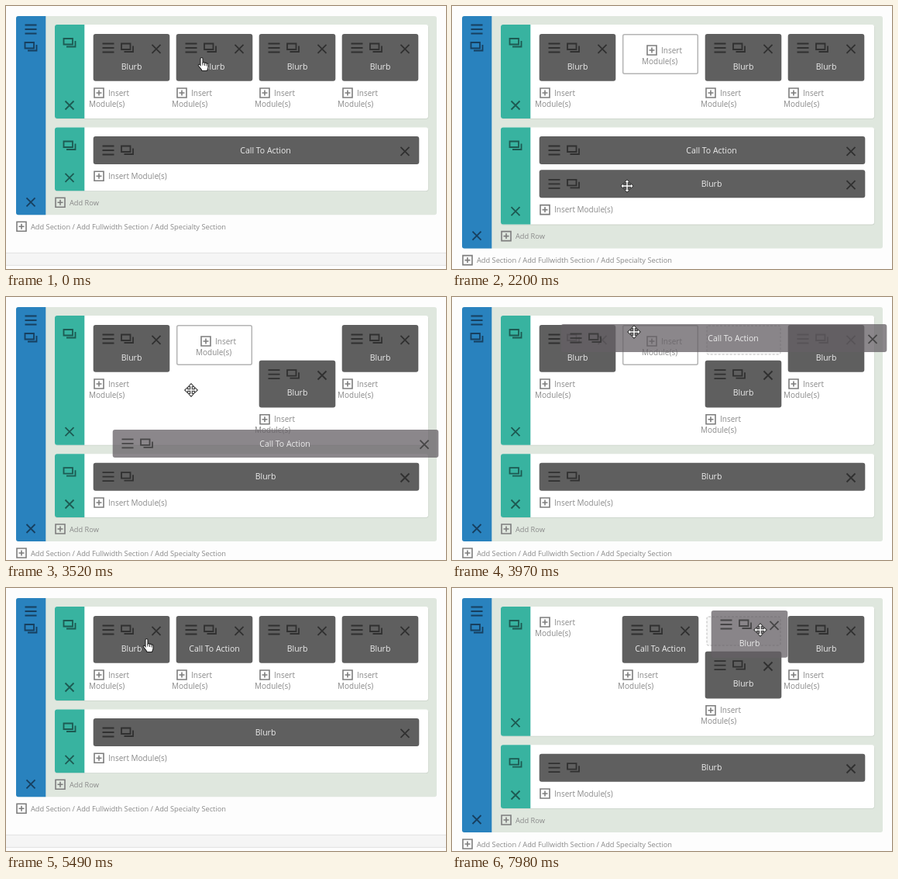
These frames come from a looping animation (568 by 339 pixels, 8 s). An HTML page:

```html
<!DOCTYPE html>
<html lang="en">
<head>
<meta charset="utf-8">
<title>Page builder drag and drop</title>
<style>
html, body { margin: 0; width: 100%; height: 100%; overflow: hidden; background: #fdfdfd; }
svg { display: block; width: 568px; height: 339px; font-family: "Open Sans", "Noto Sans", sans-serif; }
.module { fill: #5f5f5f; }
.icon { fill: none; stroke-width: 1.8; }
.plus { fill: none; stroke: #7d7d7d; stroke-width: 1.6; }
.label { font-size: 10.5px; fill: #ececec; text-anchor: middle; }
.insert { font-size: 10px; fill: #8a8a8a; }
.add { font-size: 9.25px; fill: #8a8a8a; }
.slot { fill: #f7f7f7; stroke: #bcbcbc; stroke-dasharray: 3 2; }
#item .module { fill: #645f64; fill-opacity: .75; }
#item .icon { opacity: .75; }
</style>
</head>
<body>
<svg viewBox="0 0 568 339">
  <g id="page"></g>
  <g id="item"></g>
  <g id="hand">
    <path d="M-3-7c0-2 3-2 3 0v5c1-1 2.500-.5 2.500.5c1-.8 2.500-.3 2.500.8c1-.5 2 0 2 1.200v3c0 2-1 3-1.500 5h-6.500c-.5-2-3-4-4.500-6.500c-.8-1.800 1-2.500 2.500-.5z"
      fill="#fff" stroke="#222" stroke-width="1.100"/>
    <path d="M0-2v3.500M2.500-1v3M5 0v2.500" stroke="#222" stroke-width=".9"/>
  </g>
  <g id="move">
    <path d="M0-8.300l3.600 3.900h-2.300v3.100h3.100v-2.300l3.900 3.600l-3.900 3.600v-2.300h-3.100v3.100h2.300l-3.600 3.900l-3.600-3.900h2.300v-3.100h-3.100v2.300l-3.900-3.600l3.900-3.600v2.300h3.100v-3.100h-2.300z"
      fill="#fff" stroke="#484848" stroke-width="1.200"/>
  </g>
</svg>
<script>
const LOOP = 8000, LAG = 40, SLOT_DELAY = 60, WIDE = 420, COL = 98, ROW = 4;
const $ = id => document.getElementById(id);

// Four columns, then the full-width row: B blurb, C call to action, P drop slot
const initial = ['B', 'B', 'B', 'B', 'C'];

// Each hop opens the drop slot: time, place, index within that place
const drags = [
  { code: 'B', from: 1, lift: 520, drop: 1750, hops: [[520, 1, 0], [900, ROW, 0], [1400, ROW, 1]] },
  { code: 'C', from: ROW, lift: 2760, drop: 5150, hops: [[2760, ROW, 0], [3490, 2, 0], [4990, 1, 0]] },
  { code: 'B', from: 0, lift: 7000, drop: LOOP, hops: [[7000, 0, 0], [7250, 1, 0], [7560, 2, 0]] }
];

// Pointer stops: departure, arrival, x, y
const stops = [
  [-1, 0, 254, 75], [100, 420, 242, 84], [600, 1080, 265, 215],
  [1180, 1680, 226, 232], [2420, 2700, 207, 178], [2900, 3440, 232, 181],
  [3480, 3520, 239, 120], [3560, 3900, 235, 45], [4000, 4600, 213, 46],
  [5150, 5450, 183, 74], [5830, 6200, 240, 82], [6200, 6700, 176, 61],
  [7030, 7930, 398, 54]
];

const rect = (x, y, w, h, attrs) =>
  `<rect x="${x}" y="${y}" width="${w}" height="${h}" ${attrs}/>`;
const text = (x, y, cls, s) => `<text x="${x}" y="${y}" class="${cls}">${s}</text>`;
const shape = (d, x, y, color) =>
  `<path class="icon" d="${d}" transform="translate(${x} ${y})" stroke="${color}"/>`;
const bars = (x, y, c) => shape('M-7.500-5.500h15M-7.500 0h15M-7.500 5.500h15', x, y, c);
const copy = (x, y, c) => shape('M-8-5.500h11.500v7.500h-11.500zM7-2.500v7.500h-11.500', x, y, c);
const cross = (x, y, c) => shape('M-5.500-5.500l11 11M5.500-5.500l-11 11', x, y, c);
const plus = (x, y) =>
  `<path class="plus" d="M${x - 6} ${y - 6}h12v12h-12zM${x - 3.5} ${y}h7M${x} ${y - 3.5}v7"/>`;
const sidebar = (x, y, w, h, color) =>
  `<path d="M${x + w} ${y}v${h}h${3 - w}q-3 0-3-3v${6 - h}q0-3 3-3z" fill="${color}"/>`;

const isWide = place => place === ROW;
const home = place => isWide(place) ? [113, 168] : [113 + 107 * place, 36];

function moduleBox(x, y, wide, code) {
  const dark = '#303030';
  return rect(x - .3, y, (wide ? WIDE : COL) + .6, wide ? 36 : 60.7, 'rx="3" class="module"') +
    bars(x + 19, y + 18, dark) + copy(x + 44, y + 18, dark) +
    cross(x + (wide ? 402 : 81), y + 19.300, dark) +
    text(x + (wide ? 222 : 49), y + (wide ? 21.7 : 45.7), 'label',
      code === 'C' ? 'Call To Action' : 'Blurb');
}

function insertLink(x, y, wide) {
  return plus(x + 7, y) + (wide
    ? text(x + 19, y + 3.6, 'insert', 'Insert Module(s)')
    : text(x + 19, y + 3.6, 'insert', 'Insert') + text(x - 6, y + 17.6, 'insert', 'Module(s)'));
}

// Stacks modules downwards and returns the markup with the next free y
function stack(x, y, wide, codes) {
  if (codes === 'E') {
    const frame = rect(x + .7, y + .7, COL - 1.4, 50.5, 'rx="2" fill="#fff" stroke="#b4b4b4" stroke-width="1.5"');
    return { svg: frame + insertLink(x + 31, y + 21), y };
  }
  let svg = '';
  for (const code of codes) {
    if (code === 'P') svg += rect(x + 2, y + 1, (wide ? WIDE : COL) - 3, 37, 'class="slot" rx="2"');
    else if (code !== ' ') svg += moduleBox(x, y, wide, code);
    y += 'P '.includes(code) ? 45.7 : wide ? 43.3 : 68;
  }
  return { svg: svg + insertLink(x, y + 8, wide), y };
}

function rowBox(top, bottom, content) {
  const h = bottom - top, dark = '#1d5a52';
  return rect(63, top + .8, 482.5, h, 'rx="3" fill="#cbd3ca"') +
    rect(63, top, 482, h, 'rx="3" fill="#fff"') +
    sidebar(63, top, 38.3, h, '#38b3a0') +
    copy(82.5, top + 23.5, dark) + cross(82, bottom - 17, dark) + content;
}

function drawPage(places) {
  const columns = places.slice(0, ROW).map((codes, i) => stack(...home(i), false, codes));
  const end1 = Math.max(...columns.map(c => c.y)) + 41;
  const top2 = end1 + 11.5;
  const wideRow = stack(113, top2 + 11.5, true, places[ROW]);
  const end2 = wideRow.y + 27;
  const end = end2 + 31, h = end - 13, dark = '#173f5f';
  $('page').innerHTML =
    rect(0, end + 49, 568, 16, 'fill="#f5f5f5"') +
    `<path d="M0 ${end + 49}h568m0 16h-568" stroke="#e2e2e2"/>` +
    rect(13, 13, 543, h, 'rx="3" fill="#dfe7de"') +
    sidebar(13, 13, 38.3, h, '#2982be') +
    bars(32, 30, dark) + copy(32.5, 52.5, dark) + cross(32, end - 16.5, dark) +
    rowBox(24, end1, columns.map(c => c.svg).join('')) +
    rowBox(top2, end2, wideRow.svg) +
    plus(70, end2 + 15) + text(82, end2 + 18.5, 'add', 'Add Row') +
    plus(20, end2 + 46) +
    text(32, end2 + 49.5, 'add', 'Add Section / Add Fullwidth Section / Add Specialty Section');
}

// Replays every drag begun so far
function placesAt(t, active) {
  const places = [...initial];
  for (const { code, from, lift, drop, hops } of drags) {
    if (t < lift) break;
    places[from] = places[from].replace(code, '');
    const [time, to, index] = hops.findLast(hop => hop[0] <= t);
    const mark = t >= drop ? code : t - time < SLOT_DELAY ? ' ' : 'P';
    places[to] = places[to].slice(0, index) + mark + places[to].slice(index);
  }
  return places.map((codes, i) => codes || (active?.from === i ? '' : 'E'));
}

function pointer(t) {
  const i = Math.max(1, stops.findLastIndex(s => s[0] <= t));
  const [, , x0, y0] = stops[i - 1], [leave, arrive, x1, y1] = stops[i];
  const u = Math.min(1, Math.max(0, (t - leave) / (arrive - leave)));
  const e = u * u * (3 - 2 * u);
  return [x0 + (x1 - x0) * e, y0 + (y1 - y0) * e];
}

const moveTo = (el, x, y) => el.setAttribute('transform', `translate(${x} ${y})`);
const show = (el, on) => el.setAttribute('visibility', on ? 'visible' : 'hidden');

let drawn = '', held;
function render(t) {
  const drag = drags.find(d => t >= d.lift && t < d.drop);
  const places = placesAt(t, drag), key = places.join();
  if (key !== drawn) {
    drawPage(places);
    drawn = key;
  }

  if (drag !== held) {
    $('item').innerHTML = drag ? moduleBox(0, 0, isWide(drag.from), drag.code) : '';
    held = drag;
  }
  if (drag) {
    const [x, y] = pointer(t - LAG), [gx, gy] = pointer(drag.lift), [hx, hy] = home(drag.from);
    moveTo($('item'), hx + x - gx, hy + y - gy);
  }

  const pointing = t < drags[0].lift || (t > drags[1].drop + 100 && t < drags[2].lift);
  show($('hand'), pointing);
  show($('move'), !pointing);
  moveTo($(pointing ? 'hand' : 'move'), ...pointer(t));
}

const start = performance.now();
function tick() {
  render((performance.now() - start) % LOOP);
  requestAnimationFrame(tick);
}
tick();
</script>
</body>
</html>
```
